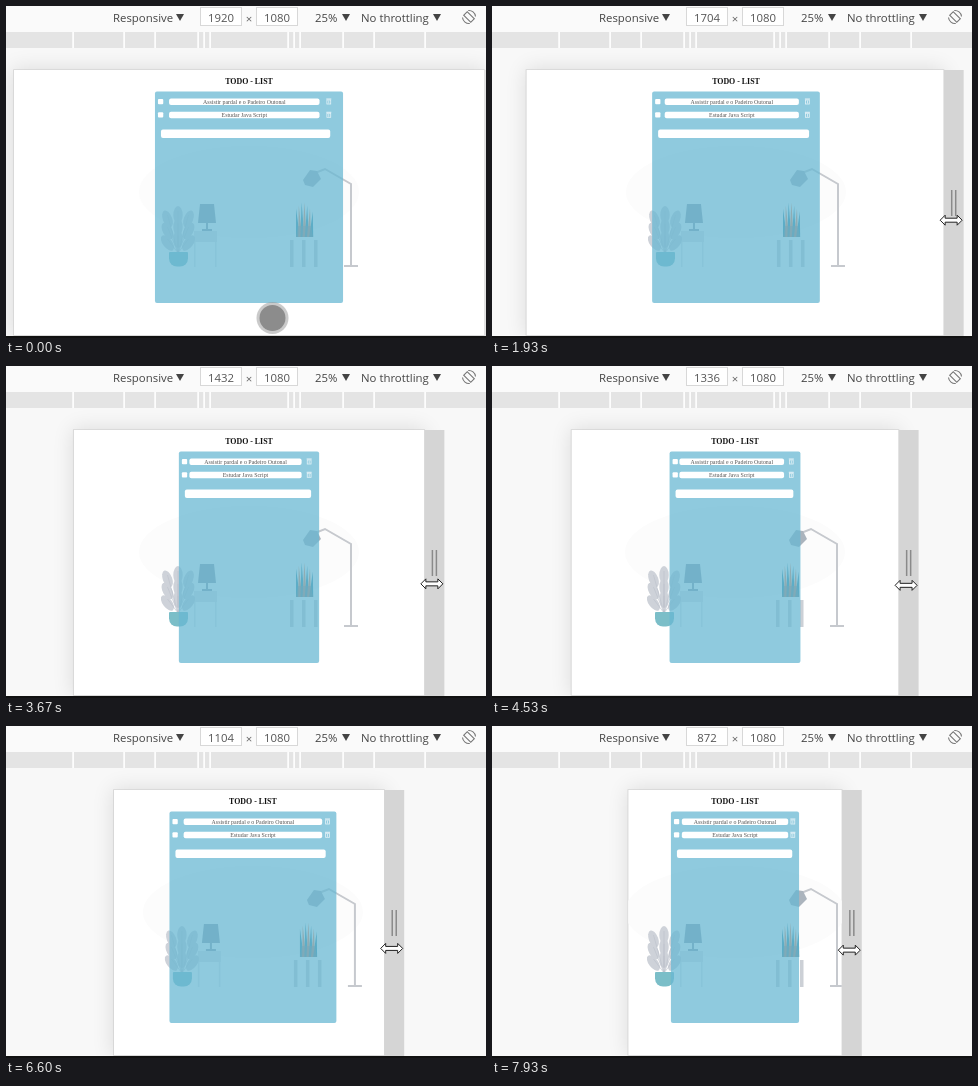
An HTML page with a canvas for the animation above (8000 ms loop, 480 by 332 pixels).

```html
<!DOCTYPE html>
<html lang="pt">
<head>
<meta charset="utf-8">
<style>
html, body { margin: 0; width: 480px; height: 332px; overflow: hidden; background: #f8f8f8 }
canvas { display: block }
</style>
</head>
<body>
<canvas id="stage" width="480" height="332"></canvas>
<script>
const c = document.getElementById('stage').getContext('2d');
const LOOP = 8000, FPS = 15, SCALE = .2449, MID = 243, GRAB = 10;
const SANS = '11.4px "Open Sans", "Noto Sans", sans-serif';
const SERIF = '"Liberation Serif", "Times New Roman", serif';

// Each drag: first tick, last tick, width reached in steps of 8 px
const START = 240;
const DRAGS = [[15, 20, 231], [21, 26, 215], [27, 39, 201], [41, 49, 197], [49, 54, 179],
  [63, 67, 167], [75, 77, 165], [80, 83, 149], [96, 99, 138], [104, 117, 109]];

const clamp = v => Math.max(0, Math.min(1, v));

function widthAt(tick) {
  let w = START;
  for (const [from, to, end] of DRAGS) w += (end - w) * clamp((tick - from) / (to - from));
  return 8 * Math.round(w);
}

function rect(x, y, w, h, fill) {
  c.fillStyle = fill;
  c.fillRect(x, y, w, h);
}
function round(x, y, w, h, r, fill) {
  c.fillStyle = fill;
  c.beginPath();
  c.roundRect(x, y, w, h, r);
  c.fill();
}
function oval(x, y, rx, ry, turn, fill) {
  c.fillStyle = fill;
  c.beginPath();
  c.ellipse(x, y, rx, ry, turn, 0, 7);
  c.fill();
}
function trace(points) {
  c.beginPath();
  for (let i = 0; i < points.length; i += 2) c.lineTo(points[i], points[i + 1]);
}
function poly(points, fill) {
  trace(points);
  c.fillStyle = fill;
  c.fill();
}
function line(points, stroke, width = 1) {
  trace(points);
  c.strokeStyle = stroke;
  c.lineWidth = width;
  c.stroke();
}
function text(s, x, y, font, fill, align = 'left') {
  c.font = font;
  c.fillStyle = fill;
  c.textAlign = align;
  c.fillText(s, x, y);
}
function clipTo(x, y, w, h) {
  c.save();
  c.beginPath();
  c.rect(x, y, w, h);
  c.clip();
}

function toolbar(width) {
  rect(0, 0, 480, 26, '#fafafa');
  rect(0, 26, 480, 16, '#e4e4e4');
  for (const d of [176, 125, 94, 51, 45, 39])
    for (const x of [MID - d, MID + d]) rect(x - .7, 26, 1.6, 16, '#fff');

  for (const [label, x, arrow] of [['Responsive', 107, 170], ['25%', 309, 336], ['No throttling', 355, 427]]) {
    text(label, x, 16, SANS, '#444');
    poly([arrow, 8, arrow + 8, 8, arrow + 4, 15], '#444');
  }
  for (const [x, value] of [[194, width], [250, 1080]]) {
    rect(x, 1, 42, 19, '#d8d8d8');
    rect(x + 1, 2, 40, 17, '#fff');
    text(value, x + 21, 16, SANS, '#555', 'center');
  }
  text('×', 243, 17, SANS, '#666', 'center');

  c.save();
  c.translate(463, 11);
  c.rotate(-Math.PI / 4);
  c.strokeStyle = '#777';
  c.lineWidth = 1.1;
  c.strokeRect(-2.5, -5, 5, 10);
  for (const a of [-.9, 2.24]) {
    c.beginPath();
    c.arc(0, 0, 6.5, a, a + 1.6);
    c.stroke();
  }
  c.restore();
}

function floorLamp() {
  const metal = '#c6c9ce';
  line([338, 260, 352, 260], metal, 2);
  line([345, 260, 345, 178, 319, 163, 309, 167], metal, 2);
  poly([297, 174, 304, 164, 311, 165, 315, 173, 307, 181, 299, 179], '#abb4bd');
}

function tableLamp() {
  const shade = '#93a0ad';
  poly([194, 198, 208, 198, 210, 217, 192, 217], shade);
  rect(200, 217, 2, 7, shade);
  rect(196, 223, 10, 2, shade);
  rect(188, 225, 23, 11, '#e3e6ea');
  for (const x of [188, 209]) rect(x, 236, 1.5, 25, '#e6e8ec');
}

function leafyPlant() {
  for (let i = 0; i < 9; i++) {
    const lean = i % 3 - 1, tier = Math.floor(i / 3);
    const x = 172 + lean * 10.5, y = 237 - 12 * tier - (lean ? 0 : 4);
    oval(x, y, 4.7, 9, lean * (.65 - .15 * tier), '#ced2d9');
    line([x, y - 4, 172, 247], '#bcc2cc', .6);
  }
  round(163, 246, 19, 14.5, [1, 1, 8, 8], '#7bbec8');
}

function spikyPlant() {
  for (let i = 0; i < 7; i++) {
    const x = 292 + i * 2.2, tip = 290 + i * 2.8;
    poly([x - 2, 231, tip, 195 + Math.abs(i - 2.5) * 3, x + 2, 231], i % 2 ? '#ff8a58' : '#3a8fa5');
  }
  poly([292, 220, 305, 220, 307, 231, 290, 231], 'rgba(150,130,125,.55)');
  for (const x of [284, 296, 308]) rect(x, 234, 3.5, 27, '#ccd0d6');
}

function list(center, pageWidth) {
  const wide = pageWidth >= 1200;
  const w = pageWidth * SCALE * (wide ? .4 : .6), x = center - w / 2;
  const barX = x + w * (wide ? .075 : .085), barW = w * (wide ? .8 : .83);
  const binX = x + w * (wide ? .911 : .932), pale = '#e4f2f7';

  text('TODO - LIST', center, 77.5, 'bold 7.9px ' + SERIF, '#111', 'center');
  round(x, 85.5, w, 211.5, 2, 'rgba(104,184,211,.74)');
  ['Assistir pardal e o Padeiro Outonal', 'Estudar Java Script'].forEach((label, i) => {
    const y = 92.5 + i * 13.3;
    round(x + 3, y + .5, 5.3, 5.3, 1, '#fff');
    round(barX, y, barW, 6.5, 2, '#fff');
    text(label, barX + barW / 2, y + 5.2, '5.9px ' + SERIF, '#555', 'center');
    rect(binX, y, 5, 1, pale);
    c.strokeStyle = pale;
    c.lineWidth = .8;
    c.strokeRect(binX + .6, y + 1.5, 3.8, 4);
    rect(binX + 2.1, y + 2, .8, 3, pale);
  });
  round(x + 6, 123.5, w * .9, 8.5, 2, '#fff');
}

function resizePointer(x, y) {
  c.beginPath();
  for (const s of [-1, 1])
    for (const [dx, dy] of [[6, 2], [6, 5], [11, 0], [6, -5], [6, -2]])
      c.lineTo(x + s * dx, y + s * dy);
  c.closePath();
  c.fillStyle = '#fff';
  c.fill();
  c.strokeStyle = '#222';
  c.lineWidth = 1;
  c.stroke();
}

function touch(tick) {
  const p = clamp(tick / 7), x = 266.5 + 232 * p, y = 312 - 104 * p;
  oval(x, y, 16, 16, 0, 'rgba(150,150,150,.5)');
  oval(x, y, 13, 13, 0, '#8c8c8c');
}

function draw(ms) {
  const tick = Math.floor((ms + 4) * FPS / 1000);
  const width = widthAt(tick), layout = widthAt(tick - 1); // contents trail the frame by a tick
  const half = width * SCALE / 2, left = MID - half, right = MID + half;
  const center = left + layout * SCALE / 2;

  rect(0, 0, 480, 332, '#f8f8f8');
  toolbar(width);

  clipTo(0, 42, 480, 290);
  c.shadowColor = 'rgba(0,0,0,.12)';
  c.shadowBlur = 20;
  rect(left - .7, 63.3, half * 2 + 1.4, 266.4, '#d5d5d5');
  c.restore();
  rect(right, 64, 20, 266, tick < GRAB ? '#e2e2e2' : '#d5d5d5');
  for (const d of [8, 12]) rect(right + d - .7, 184, 1.5, 26, '#8a8a8a');

  clipTo(left, 64, half * 2, 265);
  rect(left, 64, half * 2, 265, '#fff');
  c.save();
  c.translate(center - MID, 0);
  oval(MID, 186, 110, 46, 0, '#fcfcfc');
  floorLamp();
  tableLamp();
  leafyPlant();
  spikyPlant();
  c.restore();
  list(center, layout);
  c.restore();

  rect(0, 330, 480, 2, '#111');
  if (tick < GRAB) touch(tick);
  else resizePointer(right + 7.5, 204.5 + 1.8 * Math.sqrt(tick));
}

function loop() {
  draw(performance.now() % LOOP);
  requestAnimationFrame(loop);
}
loop();
</script>
</body>
</html>
```
